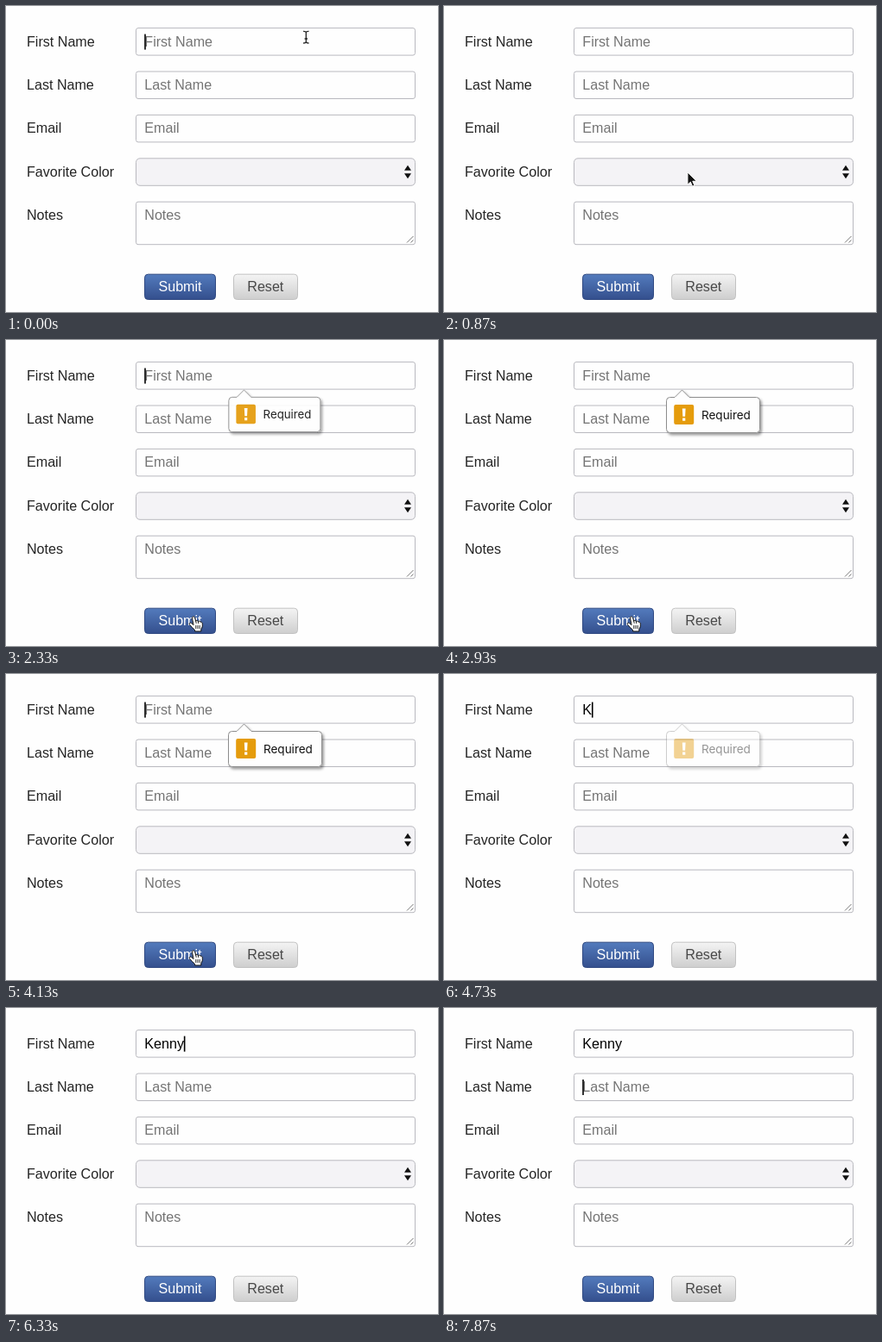
Recreate the animation shown at these times as an HTML page. Size 500x355 px, loop 8000 ms.

```html
<!DOCTYPE html>
<html lang="en">
<head>
<meta charset="utf-8">
<title>Form validation</title>
<style>
  html, body { margin: 0; width: 100%; height: 100%; overflow: hidden; background: #fefefe; }
  svg { display: block; width: 500px; height: 355px; }
  text { font: 16.1px "Liberation Sans", Arial, sans-serif; fill: #242424; white-space: pre; }
  .field { fill: #fefefe; stroke: #b9b9bf; }
  .hint { fill: #747474; }
  .bubble text { font: 13.5px Inter, sans-serif; fill: #111; }
</style>
</head>
<body>
<svg id="stage" viewBox="0 0 500 355">
  <defs>
    <linearGradient id="blue" x2="0" y2="1">
      <stop offset="0" stop-color="#537bbd"/><stop offset="1" stop-color="#344f8d"/>
    </linearGradient>
    <linearGradient id="gray" x2="0" y2="1">
      <stop offset="0" stop-color="#f4f4f4"/><stop offset="1" stop-color="#cecece"/>
    </linearGradient>
    <filter id="shadow" x="-10%" y="-20%" width="125%" height="150%">
      <feDropShadow dx="2" dy="2.5" stdDeviation="1.6" flood-color="#000" flood-opacity=".38"/>
    </filter>
  </defs>
  <g id="form"></g>
  <g id="buttons">
    <rect id="submit" x="160.5" y="311.2" width="82" height="29.3" rx="4" fill="url(#blue)" stroke="#314a82"/>
    <text x="201.5" y="331.2" text-anchor="middle" style="fill:#fff">Submit</text>
    <rect x="263.5" y="311.2" width="74" height="29.3" rx="4" fill="url(#gray)" stroke="#c2c2c2"/>
    <text x="300.3" y="331.2" text-anchor="middle" style="fill:#484848">Reset</text>
  </g>
  <text id="typed" x="160.3" y="46.6" style="fill:#000"></text>
  <rect id="caret" width="1.6" height="18" fill="#000"/>
  <g id="bubbles"></g>
  <g id="cursor">
    <path data-kind="beam" fill="none" stroke="#222" stroke-width="1.3"
      d="M-3.2-6.8Q0-7 0-5Q0-7 3.2-6.8M0-5V5M-3.2 6.8Q0 7 0 5Q0 7 3.2 6.8M-1.7 1.8H1.7"/>
    <path data-kind="arrow" fill="#111" stroke="#fff"
      d="M0 0V14.5L3.4 11.3L5.6 16.4L8 15.3L5.8 10.4H10.4Z"/>
    <g data-kind="hand" stroke="#111" stroke-linejoin="round" stroke-linecap="round">
      <path fill="#fff" d="M-1.6 1.6C-2-.4 1-.9 1.6 1.2L2.7 5.2C3.4 4 5.1 4.2 5.4 5.6C6.2 4.7 7.7 5 8 6.3
        C9 5.8 10 6.4 10.2 7.6C10.7 10.4 10.2 12.6 8.8 14.3V17H1.6V15.4C-.7 13.6-2.2 11.7-4.5 9.2
        C-5.6 7.7-3.9 6.4-2.5 7.5L-.2 9.3Z"/>
      <path fill="none" stroke-width=".9" d="M2.8 10.4V13.6M5 10.4V13.6M7.2 10.4V13.6M2.7 5.2L3.2 7.4M5.4 5.6L5.7 7.6"/>
    </g>
  </g>
</svg>
<script>
const LOOP = 8000;
const $ = id => document.getElementById(id);
const clamp = v => Math.max(0, Math.min(1, v));
const progress = (t, from, to) => clamp((t - from) / (to - from));
const easeOut = p => 1 - (1 - p) ** 3;
const easeInOut = p => p * p * (3 - 2 * p);

const rowY = row => 25.6 + row * 50.4;
const labels = ["First Name", "Last Name", "Email", "Favorite Color", "Notes"];
$("form").innerHTML = labels.map((label, row) => {
  const y = rowY(row), isSelect = row === 3;
  return `<text x="24" y="${y + 21}">${label}</text>
    <rect class="field" x="150.5" y="${y}" width="323" height="${row === 4 ? 49.5 : 31.5}"
      rx="${isSelect ? 4.5 : 2.5}" ${isSelect ? 'style="fill:#f4f3f6"' : ""}/>
    ${isSelect ? "" : `<text class="hint" x="160.3" y="${y + 21}">${label}</text>`}`;
}).join("") +
  `<path d="M461 190.8L465 184.8L469 190.8ZM461 194.2H469L465 200.2Z" fill="#111"/>
   <path d="M464 274.5L471.5 267M468.5 274.5L471.5 271.5" stroke="#777" fill="none"/>`;
const firstHint = document.querySelector(".hint");

function makeBubble(left, width, message) {
  const g = document.createElementNS("http://www.w3.org/2000/svg", "g");
  g.setAttribute("class", "bubble");
  g.innerHTML = `<path filter="url(#shadow)" fill="#fefefe" stroke="#8d8d8d"
      d="M4 66.5H9.5L18 58L26.5 66.5H${width - 4}q4 0 4 4V103.5q0 4-4 4H4q-4 0-4-4V70.5q0-4 4-4Z"/>
    <rect x="8.7" y="75" width="23" height="23" rx="2" fill="#e59c0c"/>
    <path d="M18.3 79.5H22.1L21.6 88.7H18.8ZM18.6 90.6H21.8V93.8H18.6Z" fill="#fff"/>
    <text x="40.5" y="91.6">${message}</text>`;
  $("bubbles").append(g);
  return (opacity, scale) => {
    g.setAttribute("opacity", opacity);
    g.setAttribute("transform",
      `translate(${left + 18} 58) scale(${scale}) translate(-18 -58)`);
  };
}
const required = makeBubble(257.5, 108, "Required");
const longer = makeBubble(209.5, 202, "You need a longer name");

const name = "Kenny";
const keyTimes = [4600, 4800, 5000, 5200, 5330];
// [start, end, row]
const caretSpans = [
  [0, 470, 0], [1000, 1530, 0], [2000, 2530, 0], [3070, 3600, 0], [4130, 5800, 0],
  [6330, 6870, 0], [6870, 7330, 1], [7870, LOOP, 1]
];

function drawText(t) {
  const count = keyTimes.filter(k => t >= k).length;
  $("typed").textContent = name.slice(0, count);
  firstHint.style.display = count ? "none" : "";
  const span = caretSpans.find(([a, b]) => t >= a && t < b);
  $("caret").style.display = span ? "" : "none";
  if (!span) return;
  const row = span[2];
  const offset = row === 0 && count ? $("typed").getComputedTextLength() : 0;
  $("caret").setAttribute("x", 160.2 + offset);
  $("caret").setAttribute("y", rowY(row) + 7);
}

function drawBubbles(t) {
  const shown = easeOut(progress(t, 2130, 2530));
  const hidden = progress(t, 4580, 4850);
  required(Math.min(1, shown * 1.06) * (1 - hidden), 0.85 + 0.15 * shown);
  const hint = t < 5130 ? progress(t, 5000, 5130) : 1 - progress(t, 5130, 5200);
  longer(0.11 * hint, 0.98);
}

function cursorKind(x, y) {
  if (x > 160 && x < 243 && y > 311 && y < 341) return "hand";
  const row = Math.floor((y - 25.6) / 50.4);
  const height = row === 4 ? 50 : 32;
  return row !== 3 && row < 5 && x > 150 && y - rowY(row) < height ? "beam" : "arrow";
}

function drawCursor(t) {
  const p = easeInOut(progress(t, 400, 1270));
  let x = 347.3 - 116.3 * p, y = 36.2 + 278.8 * p;
  if (t >= 1730) [x, y] = [217, 321];
  const kind = cursorKind(x, y);
  $("cursor").setAttribute("transform", `translate(${x} ${y})`);
  $("cursor").style.display = t < 4600 ? "" : "none";
  for (const shape of $("cursor").children)
    shape.style.display = shape.dataset.kind === kind ? "" : "none";
  $("submit").style.filter = t >= 2000 && t < 2130 ? "brightness(.88)" : "";
}

function render(t) {
  drawText(t);
  drawBubbles(t);
  drawCursor(t);
}

const start = performance.now();
function frame(now) {
  render(Math.max(0, now - start) % LOOP);
  requestAnimationFrame(frame);
}
render(0);
requestAnimationFrame(frame);
</script>
</body>
</html>
```
